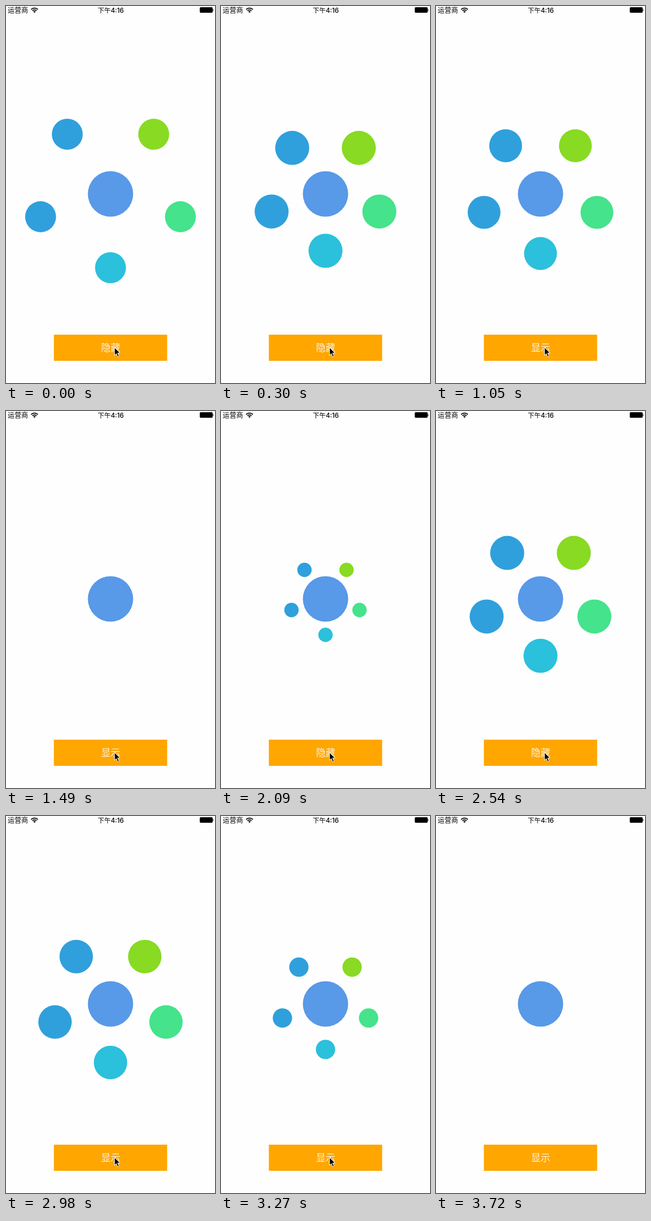
Animation, 369 px wide and 663 px high, one loop 4.3 s. Source, as an HTML page:

```html
<!DOCTYPE html>
<html lang="zh-CN">
<head>
<meta charset="utf-8">
<style>
  html, body { margin: 0; width: 100%; height: 100%; overflow: hidden; background: #fefefe; }
  svg { display: block; width: 369px; height: 663px; }
  text { font-family: Inter, "Noto Sans CJK SC", "Noto Sans CJK", sans-serif; }
  .carrier { font-size: 12px; font-weight: 300; }
  .clock { font-size: 11.5px; font-weight: 500; text-anchor: middle; }
  #label { font-size: 17px; font-weight: 200; fill: #fff; fill-opacity: .88; text-anchor: middle; }
</style>
</head>
<body>
<svg viewBox="0 0 369 663">
  <rect width="369" height="663" fill="#fefefe"/>
  <text class="carrier" x="3" y="11.5">运营商</text>
  <g fill="none" stroke="#000" stroke-width="1.7">
    <path d="M44.3 6.1a8.6 8.6 0 0 1 12 0"/>
    <path d="M46.6 8.4a5.2 5.2 0 0 1 7.4 0"/>
  </g>
  <path d="M50.3 12.1l-2.1-2.2a3 3 0 0 1 4.2 0z"/>
  <text class="clock" x="185" y="11.5">下午4:16</text>
  <rect x="342.5" y="2.5" width="22" height="9" rx="1.3" stroke="#000" stroke-opacity=".75"/>
  <path d="M365.4 5.4a1.8 1.8 0 0 1 0 3.4z"/>

  <circle cx="184.5" cy="330.5" r="40" fill="#5899e8"/>
  <g id="dots"></g>
  <rect x="84.5" y="578" width="200" height="46" fill="#ffa600"/>
  <text id="label" x="184.8" y="607"></text>
  <path id="cursor" d="M.5 .5V14.2L3.7 11.2L6.1 16.8L8.5 15.8L6.1 10.3H10.4Z"
        stroke="#fff" stroke-width="1" stroke-linejoin="round"/>
</svg>
<script>
const LOOP = 4300;
const TICK = 148.6; // the picture is held between ticks
const CENTER = { x: 184.5, y: 330.5 };
const COLORS = ['#2bc0db', '#2fa0dc', '#2fa0dc', '#88da23', '#45e38b'];
const REACH = 100, RADIUS = 30;

// Accelerating move between two values, held outside its time span
function easeIn(time, start, end, from, to) {
  const u = Math.min(1, Math.max(0, (time - start) / (end - start)));
  return from + (to - from) * u * u;
}

// Fly out past the resting place and settle; dots swell and shrink back
function show(t) {
  return {
    distance: t < 299 ? easeIn(t, 0, 299, 0, 130) : easeIn(t, 299, 381, 130, REACH),
    radius: t < 393 ? easeIn(t, 0, 393, 0, 45) : easeIn(t, 393, 513, 45, RADIUS)
  };
}

// Wind up outward, then fall into the center while shrinking
function hide(t) {
  const distance = t < 300 ? easeIn(t, 0, 300, REACH, 120) : easeIn(t, 300, 496, 120, 0);
  return { distance, radius: distance > 0 ? easeIn(t, 41, 608, RADIUS, 0) : 0 };
}

const PHASES = [
  { start: -306, move: show, text: '隐藏' },
  { start: 894, move: hide, text: '显示' },
  { start: 1872, move: show, text: '隐藏' },
  { start: 2856, move: hide, text: '显示' }
];
const POINTER_LEAVES = 3400;

const label = document.getElementById('label');
const cursor = document.getElementById('cursor');
const dots = COLORS.map(color => {
  const dot = document.createElementNS('http://www.w3.org/2000/svg', 'circle');
  dot.setAttribute('fill', color);
  return document.getElementById('dots').appendChild(dot);
});

function render(time) {
  const held = Math.floor(time / TICK) * TICK;
  const phase = PHASES.filter(p => p.start <= held).pop();
  const { distance, radius } = phase.move(held - phase.start);
  dots.forEach((dot, i) => {
    const angle = Math.PI / 2 + i * Math.PI * 2 / dots.length;
    dot.setAttribute('cx', CENTER.x + distance * Math.cos(angle));
    dot.setAttribute('cy', CENTER.y + distance * Math.sin(angle));
    dot.setAttribute('r', radius);
  });
  label.textContent = phase.text;

  const away = (Math.max(0, held - POINTER_LEAVES) / 166) ** 2;
  cursor.setAttribute('transform', `translate(${191 + 70 * away} ${600 + 46.5 * away})`);
}

const start = performance.now();
function tick() {
  render((performance.now() - start) % LOOP);
  requestAnimationFrame(tick);
}
tick();
</script>
</body>
</html>
```
